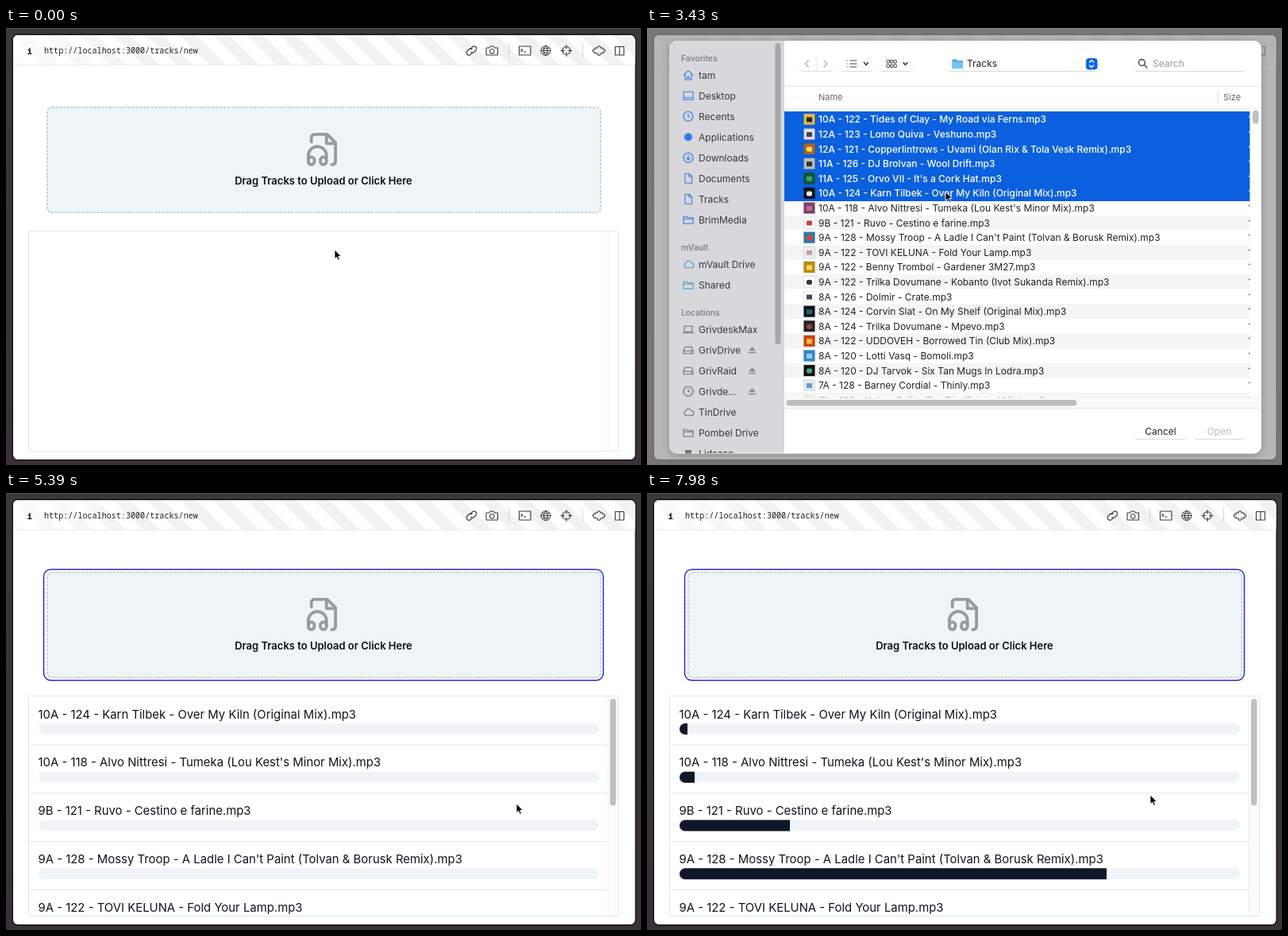
Recreate the animation shown at these times as an HTML page. Size 800 by 550 pixels, loop 8 s.

```html
<!DOCTYPE html>
<html lang="en">
<head>
<meta charset="utf-8">
<title>Track upload</title>
<style>
html, body { margin: 0; width: 100%; height: 100%; overflow: hidden; background: #383838; }
svg { display: block; width: 800px; height: 550px; font-family: Inter, "Open Sans", sans-serif; }
.mono { font-family: "Noto Sans Mono", "DejaVu Sans Mono", monospace; }
.line { fill: none; stroke-linecap: round; stroke-linejoin: round; }

.cursor, .hand, .arrow, .zone, .ring, .queue, .scroll, .thumb, .fill,
.dim, .dialog, .sel, .live, .idle, .side, .wait, .ready {
  animation-duration: 8s; animation-iteration-count: infinite; animation-timing-function: linear;
}
.hand, .arrow, .zone, .ring, .queue, .sel, .live, .idle, .side, .wait, .ready { animation-timing-function: step-end; }

.cursor { animation-name: cursor; }
@keyframes cursor {
  0%, .4% { transform: translate(414px, 279px); }
  3.5%, 31.5% { transform: translate(412px, 141px); }
  41.1%, 46.4% { transform: translate(376px, 206px); }
  51.6%, 53.4% { transform: translate(380px, 354px); }
  59.5%, 62.5% { transform: translate(735px, 500px); }
  67.3%, 72.2% { transform: translate(643px, 391px); }
  73.5%, 100% { transform: translate(634px, 380px); }
}
.hand { animation-name: hand; }
@keyframes hand { 0% { opacity: 0 } 1.7% { opacity: 1 } 33% { opacity: 0 } 59% { opacity: 1 } 63.2%, 100% { opacity: 0 } }
.arrow { animation-name: arrow; }
@keyframes arrow { 0% { opacity: 1 } 1.7% { opacity: 0 } 33% { opacity: 1 } 59% { opacity: 0 } 63.2%, 100% { opacity: 1 } }

.zone { animation-name: zone; }
@keyframes zone { 0% { stroke: #c3c8ce } 1.7% { stroke: #98a0a9 } 33%, 100% { stroke: #c3c8ce } }
.ring { animation-name: ring; }
@keyframes ring { 0% { opacity: 0 } 62.5%, 100% { opacity: 1 } }
.queue { animation-name: queue; }
@keyframes queue { 0% { opacity: 0 } 63%, 100% { opacity: 1 } }

.scroll { --d: -1px; animation-name: scroll; }
.thumb { --d: .5px; animation-name: scroll; }
@keyframes scroll {
  0%, 84% { transform: translateY(0); }
  87.5% { transform: translateY(calc(21 * var(--d))); }
  90% { transform: translateY(calc(42 * var(--d))); }
  94.5%, 100% { transform: translateY(0); }
}
.fill { animation-name: fill; }
@keyframes fill {
  0%, 75.25% { transform: translateX(-706px); }
  87.5% { transform: translateX(calc(var(--mid) - 706px)); }
  99.75%, 100% { transform: translateX(calc(var(--end) - 706px)); }
}

.dim { animation-name: dim; }
@keyframes dim { 0%, 31.5% { opacity: 0 } 34%, 61.5% { opacity: 1 } 63%, 100% { opacity: 0 } }
.dialog { animation-name: dialog; }
@keyframes dialog {
  0%, 31.5% { opacity: 0; transform: translateY(-12px); }
  34%, 60.4% { opacity: 1; transform: none; }
  61.25% { opacity: 1; transform: translateY(-2px); }
  63%, 100% { opacity: 0; transform: translateY(-10px); }
}
.live { animation-name: live; }
@keyframes live { 0% { opacity: 1 } 60.4%, 100% { opacity: 0 } }
.idle { animation-name: idle; }
@keyframes idle { 0% { opacity: 0 } 60.4%, 100% { opacity: 1 } }
.side { animation-name: side; }
@keyframes side { 0% { opacity: 1 } 60.4%, 100% { opacity: .4 } }
.wait { animation-name: wait; }
@keyframes wait { 0% { opacity: 1 } 46.4%, 100% { opacity: 0 } }
.ready { animation-name: ready; }
@keyframes ready { 0% { opacity: 0 } 46.4%, 100% { opacity: 1 } }
.sel { font-weight: 500; }
.first { animation-name: first; }
@keyframes first { 0% { opacity: 0 } 35% { opacity: 1 } 42%, 100% { opacity: 0 } }
.top6 { animation-name: top6; }
@keyframes top6 { 0% { opacity: 0 } 42% { opacity: 1 } 46.4%, 100% { opacity: 0 } }
.sixth { animation-name: sixth; }
@keyframes sixth { 0% { opacity: 0 } 46.4% { opacity: 1 } 52.5%, 100% { opacity: 0 } }
.range { animation-name: range; }
@keyframes range { 0% { opacity: 0 } 52.5% { opacity: 1 } 60.4%, 100% { opacity: 0 } }
</style>
</head>
<body>
<svg id="stage" viewBox="0 0 800 550" xmlns="http://www.w3.org/2000/svg"></svg>
<script>
const tracks = [
  "10A - 122 - Tides of Clay - My Road via Ferns",
  "12A - 123 - Lomo Quiva - Veshuno",
  "12A - 121 - Copperlintrows - Uvami (Olan Rix & Tola Vesk Remix)",
  "11A - 126 - DJ Brolvan - Wool Drift",
  "11A - 125 - Orvo VII - It's a Cork Hat",
  "10A - 124 - Karn Tilbek - Over My Kiln (Original Mix)",
  "10A - 118 - Alvo Nittresi - Tumeka (Lou Kest's Minor Mix)",
  "9B - 121 - Ruvo - Cestino e farine",
  "9A - 128 - Mossy Troop - A Ladle I Can't Paint (Tolvan & Borusk Remix)",
  "9A - 122 - TOVI KELUNA - Fold Your Lamp",
  "9A - 122 - Benny Trombol - Gardener 3M27",
  "9A - 122 - Trilka Dovumane - Kobanto (Ivot Sukanda Remix)",
  "8A - 126 - Dolmir - Crate",
  "8A - 124 - Corvin Slat - On My Shelf (Original Mix)",
  "8A - 124 - Trilka Dovumane - Mpevo",
  "8A - 122 - UDDOVEH - Borrowed Tin (Club Mix)",
  "8A - 120 - Lotti Vasq - Bomoli",
  "8A - 120 - DJ Tarvok - Six Tan Mugs In Lodra",
  "7A - 128 - Barney Cordial - Thinly",
  "7A - 126 - Nelmo Drift - The Tin (Original Mix)"
].map(name => name + ".mp3");

// cover tiles: base colour, accent colour
const covers = ("db4 222,dde 444,a62 fd6,bbb 333,153 3a6,111 eee,746 c69,fff c43,37a d43,eee c9a," +
  "b81 fd5,fff 333,fff 446,112 266,222 943,c41 fb4,38c 9cf,111 4a7,dee 69c,ccc 777").split(",").map(p => p.split(" "));

const glyphs = {
  home: "M1 7 7 1.500 13 7M3 6V13H6V9H8V13H11V6",
  desktop: "M1 2H13V12H1ZM1 9.500H13",
  clock: "M7 1A6 6 0 1 1 6.900 1ZM7 4V7.500H9.500",
  down: "M7 1A6 6 0 1 1 6.900 1ZM7 4V10M4.500 7.500 7 10 9.500 7.500",
  doc: "M3 1H8L11.500 4.500V13H3ZM8 1V4.500H11.500",
  folder: "M1 3H5L6.500 4.500H13V12H1ZM1 6H13",
  cloud: "M4 11.500A3 3 0 0 1 3.500 6 4 4 0 0 1 11 5.500 3 3 0 0 1 11 11.500Z",
  laptop: "M2 3H12V10H2ZM0 11.500H14",
  disk: "M3 3H11L13 8V11.500H1V8ZM1 8H13M10 10H11",
  dot: "M7 2A5 5 0 1 1 6.900 2Z",
  square: "M3 3H11V11H3Z"
};

const text = (x, y, s, size = 12, color = "#222", extra = "") =>
  `<text x="${x}" y="${y}" font-size="${size}" fill="${color}" ${extra}>${s}</text>`;
const box = (x, y, w, h, fill, r = 0, extra = "") =>
  `<rect x="${x}" y="${y}" width="${w}" height="${h}" rx="${r}" fill="${fill}" ${extra}/>`;
const line = (d, color, w = 1, extra = "") =>
  `<path class="line" d="${d}" stroke="${color}" stroke-width="${w}" ${extra}/>`;
const at = (x, y, body, scale = 1) => `<g transform="translate(${x} ${y}) scale(${scale})">${body}</g>`;
const clip = (id, x, y, w, h, r = 0) => `<clipPath id="${id}">${box(x, y, w, h, "#000", r)}</clipPath>`;

// file list geometry
const rowH = 18.6, listTop = 105.6, listW = 586.5;
const span = (from, to) => [173, listTop + (from - 1) * rowH, listW, (to - from + 1) * rowH];
const picks = { first: [1, 1], top6: [1, 6], sixth: [6, 6], range: [6, 14] };

const names = color => tracks.map((name, i) => {
  const mid = listTop + (i + .5) * rowH;
  const [base, accent] = covers[i];
  return box(197.5, mid - 7, 14, 14, "#" + base, 0, 'stroke="#0003" stroke-width=".5"') +
    box(201, mid - 2.5, 7, 6, "#" + accent, i % 3) +
    text(216, mid + 4.4, name, 12, color) + text(757.6, mid + 4.4, "1", 12, color);
}).join("");

const defs = `<defs>
  <pattern id="stripes" width="42" height="42" patternUnits="userSpaceOnUse">
    <path d="M0 0H21L42 21V42ZM0 21V42H21Z" fill="#f1f3f2"/></pattern>
  <linearGradient id="fade"><stop stop-color="#fff" stop-opacity=".75"/><stop offset=".2" stop-color="#fff" stop-opacity="0"/></linearGradient>
  <linearGradient id="desk" x2="0" y2="1"><stop stop-color="#393939"/><stop offset=".6" stop-color="#373536"/><stop offset="1" stop-color="#3c3039"/></linearGradient>
  <filter id="shadow" x="-10%" y="-10%" width="120%" height="120%"><feDropShadow dx="0" dy="2" stdDeviation="5" flood-opacity=".25"/></filter>
  <filter id="soft" x="-10%" y="-30%" width="120%" height="160%"><feDropShadow dx="0" dy=".5" stdDeviation=".6" flood-opacity=".28"/></filter>
  ${clip("window", 9, 9, 783.5, 534, 6)}
  ${clip("queueBox", 29, 256, 743, 276)}
  ${clip("track", 41, 290, 706, 14, 7)}
  ${clip("sheet", 28, 16, 746, 519.5, 10)}
  ${clip("files", 173, 102, listW, 364)}
  ${Object.entries(picks).map(([id, p]) => clip(id, ...span(...p))).join("")}
</defs>`;

const toolbar = () => {
  const c = "#3a3a3a";
  return box(9, 9, 784, 37, "#fff") + box(9, 9, 784, 37, "url(#stripes)") + box(9, 9, 784, 37, "url(#fade)") +
    box(9, 46, 784, 1, "#ebecec") +
    text(26.5, 32.5, "i", 11, "#111", 'class="mono" font-weight="700"') +
    text(48, 32, "http://localhost:3000/tracks/new", 10.1, "#222", 'class="mono"') +
    line("M585 26.500 587.500 24A3 3 0 0 1 592 28L589.500 30.500A3 3 0 0 1 586 30.500M588 31 585.500 33.200A3 3 0 0 1 581 29L583.500 26.500A3 3 0 0 1 587 26.500", c, 1.1) +
    line("M605 25H608.500L610 23H614L615.500 25H619.500V34H605ZM612.300 26.500A2.800 2.800 0 1 1 612.200 26.500", c, 1.1) +
    line("M633.500 20V37M726.500 20V37", "#d2d4d4") +
    line("M646.500 23H661V34H646.500ZM649 26.500 651 28 649 29.500M652.500 30H655", c, 1.1) +
    line("M680 22.500A6 6 0 1 1 679.900 22.500ZM674 28.500H686M675.500 25Q680 27.500 684.500 25M675.500 32Q680 29.500 684.500 32M680 22.500Q674.500 28.500 680 34.500Q685.500 28.500 680 22.500", c) +
    line("M706 23.500A5 5 0 1 1 705.900 23.500ZM706 21.500V26M706 31V35.500M699 28.500H703.500M708.500 28.500H713", c, 1.1) +
    line("M742 25H745.200A1.900 1.700 0 1 1 748.800 25H752V26.800A2 1.800 0 1 1 752 30.200V32H748.800A1.900 1.700 0 1 1 745.200 32H742V30.200A2 1.800 0 1 1 742 26.800Z", c, 1.1) +
    line("M767.500 23.500H778.500V34H767.500ZM773 23.500V34", c, 1.1);
};

const dropzone = () => `
  <rect class="ring" x="47.5" y="96.2" width="705" height="139.6" rx="9" fill="#fff" stroke="#2a2ad2" stroke-width="1.5"/>
  <rect class="zone" x="51.8" y="99.8" width="697.4" height="132.4" rx="6" fill="#eff4f9" stroke="#c3c8ce" stroke-width="1.5" stroke-dasharray="3.2 1.6"/>` +
  at(377.1, 130.1, [
    "M17.500 22h.5a2 2 0 0 0 2-2V7.500L14.500 2H6a2 2 0 0 0-2 2v3", "M14 2v6h6",
    "M10 20v-1a2 2 0 1 1 4 0v1a2 2 0 1 1-4 0Z", "M6 20v-1a2 2 0 1 0-4 0v1a2 2 0 1 0 4 0Z",
    "M2 19v-3a6 6 0 0 1 12 0v3"].map(d => line(d, "#969ba2", 2)).join(""), 1.9) +
  text(400, 196.5, "Drag Tracks to Upload or Click Here", 13, "#0c0f16", 'text-anchor="middle" font-weight="600"');

const queue = () => {
  const progress = [[5, 10], [8, 19], [91, 139], [8, 538], [206, 420], [12, 60], [20, 90], [8, 40], [5, 30]];
  const rows = progress.map(([mid, end], i) => at(0, i * 60.75,
    text(40.5, 283.6, tracks[i + 5], 14.9, "#10141f") +
    `<g clip-path="url(#track)">${box(41, 290, 706, 14, "#eff4f9")}
      ${box(41, 290, 706, 14, "#0f172a", 0, `class="fill" style="--mid:${mid}px;--end:${end}px"`)}</g>` +
    box(29, 316.5, 729, 1, "#e1e7ee"))).join("");
  return box(28.5, 255.5, 743, 277, "#fff", 1, 'stroke="#e3e6ea"') + box(758, 256, 1, 276, "#eceef1") +
    `<g class="queue"><g clip-path="url(#queueBox)"><g class="scroll">${rows}</g></g>
      ${box(758, 256, 13, 276, "#fcfcfc")}${box(758, 256, 1, 276, "#eceef1")}
      ${box(761, 259, 7.5, 134.5, "#bfbfbf", 3.75, 'class="thumb"')}</g>`;
};

const sidebar = () => {
  const groups = [
    [38, "Favorites", "#2f7cf0", ["home tam", "desktop Desktop", "clock Recents", "dot Applications", "down Downloads", "doc Documents", "doc Tracks", "folder BrimMedia"]],
    [276, "mVault", "#3f9cc8", ["cloud mVault Drive", "folder Shared"]],
    [358, "Locations", "#707075", ["laptop GrivdeskMax", "disk GrivDrive", "disk GrivRaid", "clock Grivde...", "cloud TinDrive", "folder Pombel Drive", "square Lidcase"]]
  ];
  const body = groups.map(([y, title, color, items]) =>
    text(43, y + 3.5, title, 10.3, "#838388", 'font-weight="600"') +
    items.map((item, i) => {
      const [icon, ...label] = item.split(" ");
      const mid = y + 21.2 + i * 26;
      const flat = icon === "dot" || icon === "square";
      return at(45, mid - 7, flat ? `<path d="${glyphs[icon]}" fill="${color}"/>` : line(glyphs[icon], color, 1.1)) +
        text(65, mid + 4.4, label.join(" "), 12, "#38383b") +
        (/Griv(Dr|Ra|de\.)/.test(item) ? `<path d="M128 ${mid + 1}L132.500 ${mid - 4}L137 ${mid + 1}ZM128 ${mid + 2.5}H137V${mid + 4}H128Z" fill="#8b8b90"/>` : "");
    }).join("")).join("");
  return box(28, 16, 145, 520, "#d8d7da") + `<g class="side">${body}</g>` + box(161.5, 19, 7, 379, "#a6a6aa", 3.5);
};

const button = (x, y, w, h) => box(x, y, w, h, "#fff", 5, 'filter="url(#soft)"');
const chevrons = c => line("M557.500 43 560 40.500 562.500 43M557.500 47 560 49.500 562.500 47", c, 1.5);

const sheetHead = () => {
  const grid = [0, 1, 2, 3, 4, 5].map(i => box(302 + i % 3 * 4.5, 40.5 + (i > 2 ? 5.5 : 0), 3.3, 3.5, "none", .5, 'stroke="#444"')).join("");
  return button(191, 36, 45, 18) + line("M213.500 37V53", "#e4e4e4") +
    line("M203.500 41 199.500 45 203.500 49M223 41 227 45 223 49", "#b0b0b0", 1.3) +
    button(242, 36, 44, 18) + line("M256 41H264M256 45H264M256 49H264M252 41H252.200M252 45H252.200M252 49H252.200", "#444", 1.2) +
    line("M273.500 43.500 276 46.500 278.500 43.500", "#333", 1.5) +
    button(292, 36, 44, 18) + grid + line("M323 43.500 325.500 46.500 328 43.500", "#333", 1.5) +
    button(376, 36, 194, 18) +
    `<path d="M384.500 39.500H389.500L391 41H398V51H384.500Z" fill="#45a9dd"/>` + box(384.5, 42.5, 13.5, 8.5, "#6fc6f0", 1) +
    text(403, 49.2, "Tracks") +
    `<g class="live">${box(553, 38, 14.5, 14.5, "#0a66e8", 4)}${chevrons("#fff")}</g><g class="idle">${chevrons("#333")}</g>` +
    button(612, 36, 143, 18) + line("M623.500 39.500A4 4 0 1 1 623.400 39.500ZM626.500 46.500 630 50", "#444", 1.3) +
    text(637, 49.3, "Search", 12, "#9a9a9a") +
    box(173, 72.5, 601, 1, "#e3e3e3") + text(216, 91, "Name", 11, "#6a6a6a") + text(726, 91, "Size", 11, "#6a6a6a") +
    box(719, 80, 1, 15, "#dcdcdc") + box(173, 101, 601, 1, "#ececec");
};

const sheet = () => {
  const bands = tracks.map((_, i) => i % 2 ? box(173, listTop + i * rowH, listW, rowH, "#f4f5f5") : "").join("");
  const chosen = Object.keys(picks).map(id =>
    `<g class="sel ${id}"><g clip-path="url(#${id})">${box(173, 102, listW, 376, "#0a60de")}${names("#fff")}</g></g>`).join("");
  return `<g class="dialog">${box(28, 16, 746, 519.5, "#fff", 10, 'filter="url(#shadow)"')}
    <g clip-path="url(#sheet)">${box(28, 16, 746, 520, "#fff")}${sidebar()}${sheetHead()}
      <g clip-path="url(#files)">${bands}<g class="idle">${box(...span(...picks.range), "#d5d5d5")}</g>${names("#222")}${chosen}</g>
      ${box(763, 103.5, 7.5, 17, "#bfbfbf", 3.75)}
      ${box(173, 461, 601, 17, "#fafafa", 0, 'opacity=".7"')}
      ${box(173, 466, 601, 12, "#fafafa")}${box(175.5, 468, 366, 7.5, "#bdbdbd", 3.75)}
      ${box(173, 478, 601, 1, "#e3e3e3")}
      ${button(613, 498, 68, 19)}${text(647, 511.5, "Cancel", 12, "#222", 'text-anchor="middle"')}
      ${button(688, 498, 67, 19)}
      <g class="wait">${text(721, 511.5, "Open", 12, "#b9b9b9", 'text-anchor="middle"')}</g>
      <g class="ready">${text(721, 511.5, "Open", 12, "#222", 'text-anchor="middle"')}</g>
    </g></g>`;
};

const cursor = `<g class="cursor">
  <path class="arrow" d="M0 0V11.500L2.700 9.200 4.500 13.300 6.500 12.400 4.700 8.500H8.300Z" fill="#000" stroke="#fff" stroke-width=".9"/>
  <g class="hand" stroke="#222" stroke-width="1" stroke-linejoin="round">
    <path d="M-1.500 1Q0-1 1.300 1L2.400 5Q4-.2 5 4.500 7 3.500 7.300 6 9.300 5.500 9.500 8L9.200 11.500 8 15.500H1L-3.500 9.800Q-4.800 7.300-2.300 7.600L-.3 9Z" fill="#fff"/>
    <path class="line" d="M2.300 10V13M4.300 10V13M6.300 10V13" stroke-width=".7"/>
  </g></g>`;

document.getElementById("stage").innerHTML = defs +
  box(0, 0, 800, 550, "url(#desk)") + box(0, 0, 800, 1, "#55505a") +
  box(8.5, 8.5, 784.5, 535, "#fff", 6.5, 'stroke="#151515" stroke-width="2"') +
  `<g clip-path="url(#window)">${box(9, 9, 784, 535, "#fff")}${toolbar()}${dropzone()}${queue()}</g>` +
  box(0, 0, 800, 550, "rgba(150,150,150,.68)", 0, 'class="dim"') +
  sheet() + cursor;
</script>
</body>
</html>
```
